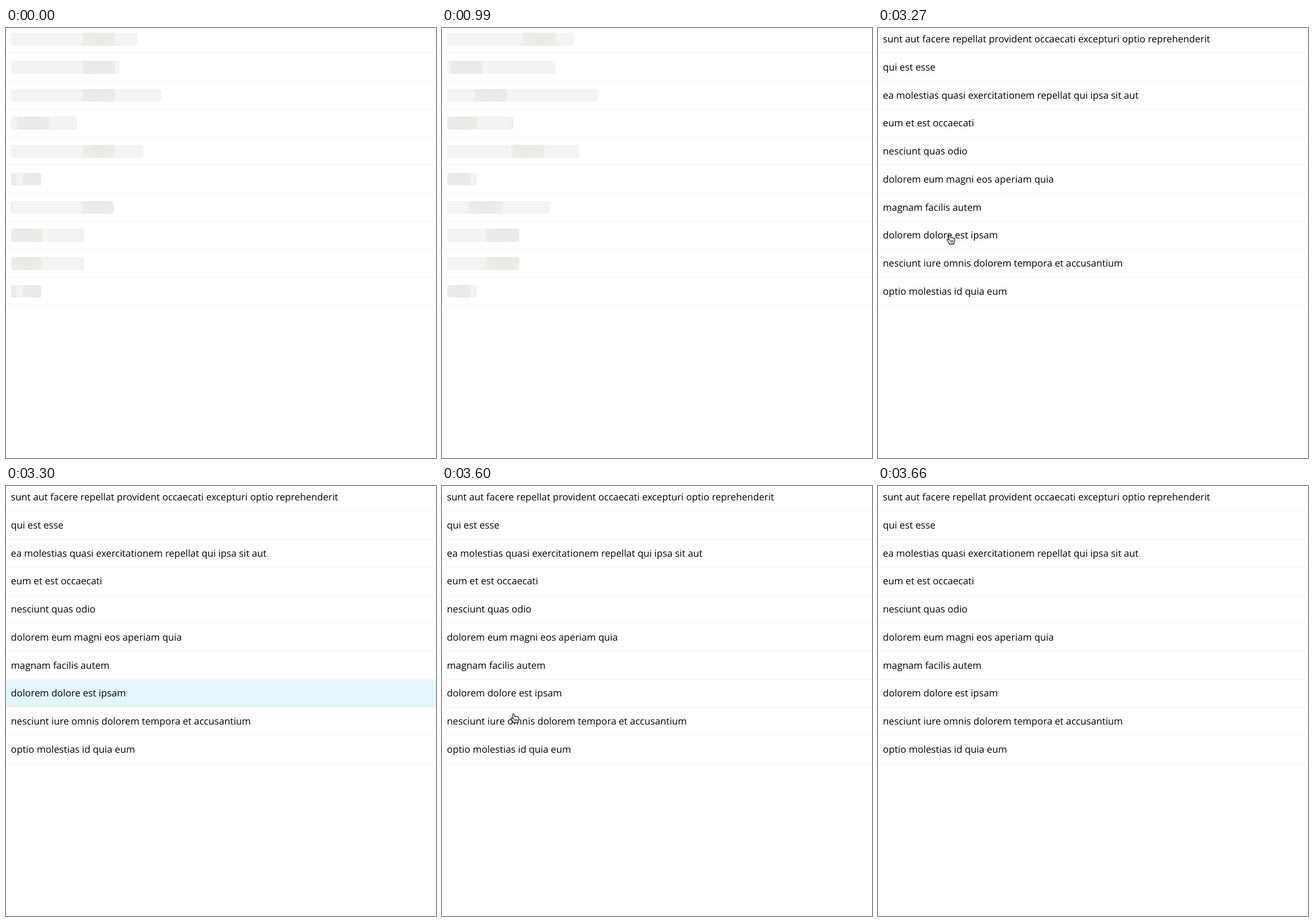
These frames come from a looping animation (748 by 748 pixels, 4290 ms). An HTML page:

```html
<!DOCTYPE html>
<html lang="la">
<head>
<meta charset="utf-8">
<title>Skeleton list</title>
<style>
  html, body { margin: 0; width: 100%; height: 100%; overflow: hidden; background: #fff; }
  body {
    position: relative;
    font: 16.7px/22.6px "Open Sans", "Noto Sans", sans-serif;
    color: #000;
    text-rendering: geometricPrecision;
  }
  .row {
    position: absolute; left: 0; width: 100%; height: 48.72px;
    top: calc(-4.37px + 48.72px * var(--i));
    box-sizing: border-box; border-bottom: 1px solid #f4f4f4;
  }
  .bar, .text { position: absolute; top: 12.57px; height: 22.6px; white-space: nowrap; }
  .text { left: 8.6px; visibility: hidden; animation: text 4290ms step-end infinite; }
  .bar {
    left: 9px; width: calc(10.475px * var(--n)); border-radius: 4px;
    background: linear-gradient(90deg, #f4f4f4 10px, #ececea 14px, #e9e9e7 40px, #ececea 66px, #f4f4f4 70px) 0 0 / 100% 100%;
    animation: shine 4290ms linear infinite, bar 4290ms step-end infinite;
  }
  .row:nth-child(8) { animation: hover-low 4290ms step-end infinite; }
  .row:nth-child(5) { animation: hover-high 4290ms step-end infinite; }
  #hand {
    position: absolute; left: 119px; top: 358px; width: 16px; height: 19px;
    visibility: hidden; animation: hand 4290ms step-end infinite;
  }
  /* 452.5 px per second */
  @keyframes shine { from { background-position-x: 112px; } to { background-position-x: 2053px; } }
  @keyframes bar { 0% { visibility: visible; } 58.04%, 100% { visibility: hidden; } }
  @keyframes text { 0% { visibility: hidden; } 58.04%, 100% { visibility: visible; } }
  @keyframes hover-low {
    0%, 77.62%, 100% { background-color: #fff; }
    76.92% { background-color: #e3f5fd; }
  }
  @keyframes hover-high {
    0%, 85.31%, 100% { background-color: #fff; }
    84.61% { background-color: #e3f5fd; }
  }
  @keyframes hand {
    0%, 76.92%, 84.61%, 100% { visibility: hidden; transform: none; }
    76.22% { visibility: visible; transform: none; }
    83.91% { visibility: visible; transform: translateY(36px); }
  }
</style>
</head>
<body>
<div id="list"></div>
<svg id="hand" viewBox="0 0 16 19" fill="#fff" stroke="#000" stroke-width="1.1" stroke-linejoin="round" stroke-linecap="round">
  <path d="M4.8 11.4L3.9 4.2C3.6 1.6 6 1.3 6.5 3.5L7.3 7C7.7 5.8 9.4 6 9.8 7.3C10.3 6.4 11.9 6.7 12.2 8C12.9 7.3 14.5 7.7 14.5 9.4V12C14.5 14 13 15.2 12.7 17.9H10.9L10 17L9 17.9H5.3C5 15.8 2.7 14.3 1.2 11.3C.3 9.4 2.3 8.6 3.4 10Z"/>
  <path d="M7.3 11.3V14.8M9.4 11.3V14.8M11.5 11.3V14.8" stroke-width=".9"/>
</svg>
<script>
  const rows = [
    [21, "sunt aut facere repellat provident occaecati excepturi optio reprehenderit"],
    [18, "qui est esse"],
    [25, "ea molestias quasi exercitationem repellat qui ipsa sit aut"],
    [11, "eum et est occaecati"],
    [22, "nesciunt quas odio"],
    [5, "dolorem eum magni eos aperiam quia"],
    [17, "magnam facilis autem"],
    [12, "dolorem dolore est ipsam"],
    [12, "nesciunt iure omnis dolorem tempora et accusantium"],
    [5, "optio molestias id quia eum"]
  ];
  document.getElementById("list").innerHTML = rows.map(([n, text], i) =>
    `<div class="row" style="--i:${i};--n:${n}"><div class="bar"></div><div class="text">${text}</div></div>`
  ).join("");
</script>
</body>
</html>
```
